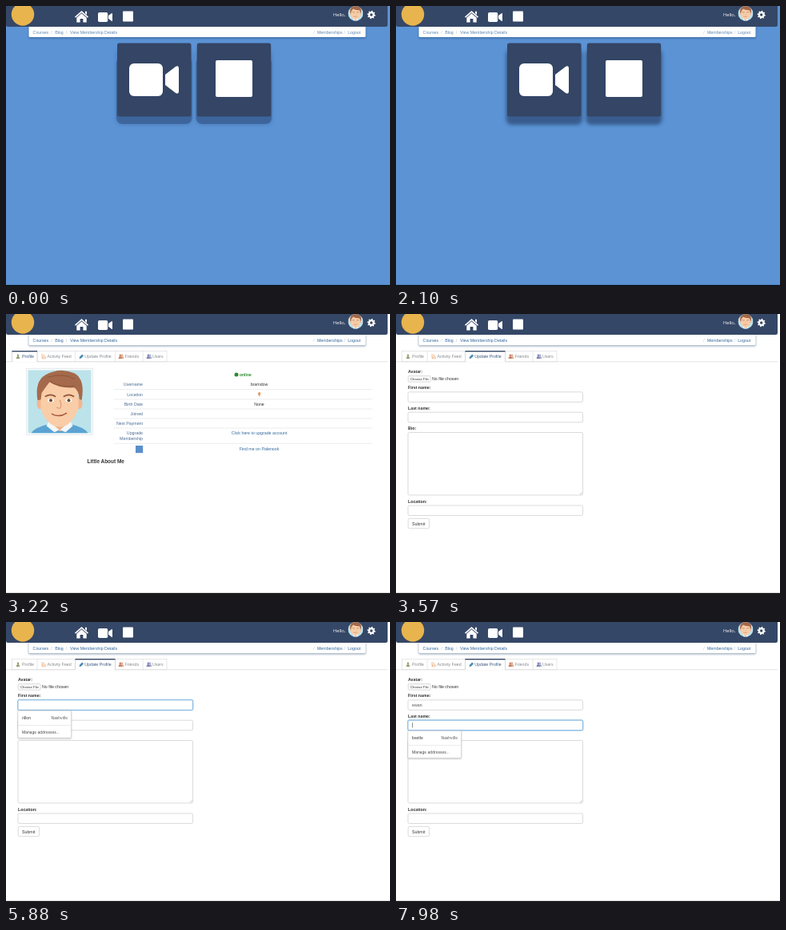
An HTML page for the animation above (8000 ms loop, 480x351 px).

```html
<!DOCTYPE html>
<html lang="en">
<head>
<meta charset="utf-8">
<title>Member profile</title>
<style>
html, body { margin: 0; width: 100%; height: 100%; overflow: hidden; background: #fff; }
svg { display: block; width: 100vw; height: 100vh; }
text { font-family: "Liberation Sans", Arial, sans-serif; font-size: 5.25px; white-space: pre; }
.b { font-weight: bold; }
.hello { font-family: "Open Sans", sans-serif; font-size: 5.7px; }
.menu text { font-family: Inter, sans-serif; font-size: 4.75px; }
</style>
</head>
<body>
<svg id="stage" viewBox="0 0 480 351" preserveAspectRatio="none"></svg>
<script>
const LOOP = 8000;
const NAVY = '#354766', LINK = '#33689c', LABEL = '#4b6b95', GREY = '#85898e', INK = '#333';

const rect = (x, y, w, h, fill, more = '') =>
  `<rect x="${x}" y="${y}" width="${w}" height="${h}" fill="${fill}" ${more}/>`;
const path = (d, fill, more = '') => `<path d="${d}" fill="${fill}" ${more}/>`;
const disc = (x, y, r, fill) => `<circle cx="${x}" cy="${y}" r="${r}" fill="${fill}"/>`;
const text = (x, y, s, fill = INK, more = '') =>
  `<text x="${x}" y="${y}" fill="${fill}" ${more}>${s}</text>`;
const group = (id, body, more = '') => `<g id="${id}" ${more}>${body}</g>`;
const at = (x, y, k, body) => `<g transform="translate(${x} ${y}) scale(${k})">${body}</g>`;
const END = 'text-anchor="end"', MID = 'text-anchor="middle"';

// Camera icon on a 62 x 41 grid
const camera = rect(0, 0, 42, 41, '#fff', 'rx="6"') +
  path('M45 14 L58 4 Q62 2 62 6 V35 Q62 39 58 37 L45 27 Z', '#fff');

// Portrait on a 79 x 79 grid
const line = (d, color, w) => path(d, 'none', `stroke="${color}" stroke-width="${w}" stroke-linecap="round"`);
const portrait = rect(0, 0, 79, 79, '#bce3ea') +
  path('M4 79 Q8 72 25 68 L39 76 L54 68 Q71 72 75 79 Z', '#5ba3d3') +
  path('M26 58 H53 V70 L40 77 L26 69 Z', '#eeb088') +
  path('M26 64 L23 70 L33 78 L39 75 Z M53 64 L56 70 L47 78 L40 75 Z', '#f2f7fa') +
  '<ellipse cx="15" cy="42" rx="4" ry="7" fill="#f3b78f"/><ellipse cx="64" cy="42" rx="4" ry="7" fill="#f3b78f"/>' +
  path('M16 25 Q17 10 40 11 Q62 10 63 25 V47 Q60 60 50 68 Q40 75 29 68 Q18 60 16 47 Z', '#f9cda8') +
  path('M12 38 Q8 14 22 6 Q40 -4 58 4 Q72 12 67 38 L64 36 Q64 27 58 22 Q38 23 27 15 Q20 24 17 29 L16 37 Z', '#a56a4b') +
  line('M27 14 Q40 22 58 20 M25 9 Q44 3 58 11', '#8d563b', 1) +
  line('M22 33 Q28 29 34 33 M45 33 Q51 29 57 33', '#8d563b', 1.8) +
  '<ellipse cx="28.5" cy="38" rx="4" ry="2.2" fill="#fff"/><ellipse cx="51" cy="38" rx="4" ry="2.2" fill="#fff"/>' +
  disc(28.5, 38, 2, '#694a35') + disc(51, 38, 2, '#694a35') +
  line('M40 38 Q43 47 39 48 L36 47', '#dd9b75', 1.2) +
  line('M30 55 Q39 60 48 54', '#a8573f', 1.5);

function gear(x, y) {
  let d = '';
  for (let i = 0; i < 32; i++) {
    const a = (i + .5) * Math.PI / 16, r = i % 4 < 2 ? 5.2 : 3.9;
    d += (i ? 'L' : 'M') + (x + r * Math.cos(a)).toFixed(2) + ' ' + (y + r * Math.sin(a)).toFixed(2);
  }
  return path(d + 'Z', '#fff') + disc(x, y, 1.7, NAVY);
}

function header() {
  const crumb = (x, s) => text(x, 34.6, s, 'currentColor');
  const slash = x => text(x, 34.6, '/', '#b5b9be');
  return rect(28, 25, 422, 15.5, '#1d3a5c', 'rx="2" opacity=".4" filter="url(#soft1)"') +
    rect(28.5, 24, 421, 15, '#fff', 'rx="1.5"') +
    path('M0 0 H477 V23.5 Q477 26 474.5 26 H2.5 Q0 26 0 23.5 Z', NAVY) +
    disc(21, 10.5, 14.2, '#e8b44d') +
    path('M94.5 6 L103 13.6 L102 14.8 L94.5 8.3 L87 14.8 L86 13.6 Z M99 6.8 H101 V11 L99 9.2 Z', '#fff') +
    path('M94.5 9.3 L100.7 14.7 V20.5 H96.4 V16 H92.6 V20.5 H88.3 V14.7 Z', '#fff') +
    at(115, 8, .29, camera) + rect(146, 6.5, 13, 13, '#fff', 'rx="1"') +
    text(409, 13, 'Hello,', '#fff', 'class="hello"') +
    `<g clip-path="url(#face)">${at(427.4, -.2, .243, portrait)}</g>` + gear(456.7, 11) +
    group('crumbs', crumb(33.6, 'Courses') + slash(56.2) + crumb(61.2, 'Blog') + slash(74.8) +
      crumb(80, 'View Membership Details') + slash(384.3) + crumb(389, 'Memberships') +
      slash(422.5) + crumb(427.2, 'Logout'));
}

function home() {
  const each = f => [139, 238.7].map(f).join('');
  return rect(0, 0, 480, 351, '#5b93d5') +
    group('hardShade', each(x => rect(x - 1.3, 64, 95, 84, '#3c659d', 'rx="8" opacity=".75"'))) +
    group('softShade', each(x => rect(x - 1.5, 54, 95.5, 95, '#253f68', 'rx="7" opacity=".65" filter="url(#soft3)"'))) +
    each(x => rect(x, 46.5, 92.5, 92, '#344565', 'rx="2.5"')) +
    at(154, 72, 1, camera) + rect(262, 68, 46, 46, '#fff', 'rx="2"');
}

function tabs() {
  const person = (x, c) => disc(x, 51.8, 1.3, c) + path(`M${x - 2.2} 56 Q${x - 2} 53 ${x} 53 Q${x + 2} 53 ${x + 2.2} 56 Z`, c);
  const pair = (x, a, b) => person(x + 1.2, b) + person(x - 1.2, a);
  const list = [[7.5, 39, 20, 'Profile'], [39, 87, 51.6, 'Activity Feed'], [86.5, 136.5, 98.3, 'Update Profile'],
    [136.5, 171, 148.5, 'Friends'], [171, 201, 183, 'Users']];
  const base = rect(7.5, 46.5, 193.5, 13.3, '#fff', 'stroke="#ddd" stroke-width=".7"') +
    list.slice(1).map(t => rect(t[0] - .3, 46.5, .7, 13, '#ddd')).join('') +
    rect(0, 59.4, 477, .8, '#ddd') +
    list.map(t => text(t[2], 55.4, t[3], GREY)).join('');
  const active = (id, [l, r, x, s]) => group(id, rect(l, 46.5, r - l, 14, '#fff') +
    path(`M${l} 60 V46.5 H${r} V60`, 'none', 'stroke="#ccc" stroke-width=".7"') +
    rect(l, 46, r - l, 1.4, NAVY) + text(x, 55.4, s, '#3c597f'));
  return base + active('tabProfile', list[0]) + active('tabUpdate', list[2]) +
    person(15, '#95a071') + disc(45.3, 55.2, .8, '#e99a5c') +
    line('M44.6 53 Q47.5 53 47.5 56 M44.6 51 Q49.3 51 49.3 56', '#e99a5c', .8) +
    path('M91.5 56.2 L92.2 53.6 L95.2 50.6 L97 52.4 L94 55.4 Z', '#4d8bb0') +
    pair(144, '#cd7c62', '#e0ac8f') + pair(179, '#7f83b5', '#aab0d0');
}

function profile() {
  const rows = [[90.4, 'Username', 'bramdow'], [102.6, 'Location', ''], [114.8, 'Birth Date', 'None'],
    [126.9, 'Joined', ''], [138.7, 'Next Payment', ''], [150.8, 'Upgrade', '']];
  const rule = y => `<path d="M135 ${y}H458" stroke="#d3d6d9" stroke-width=".7" stroke-dasharray="1 .6"/>`;
  return rect(25.7, 68.3, 82.6, 83, '#fff', 'stroke="#c3cdd4" stroke-width=".7" stroke-dasharray="1.2 .5"') +
    at(27.5, 70.3, 1, portrait) +
    disc(288, 76, 2.5, '#2f8a2f') + text(292, 77.9, 'online', '#2f8a2f', 'class="b" style="font-size:5px"') +
    rows.map(r => text(171, r[0], r[1], LABEL, END) + text(316.5, r[0], r[2], INK, MID)).join('') +
    text(171, 158.2, 'Membership', LABEL, END) +
    [94.6, 106.9, 119, 131, 143, 162.3].map(rule).join('') +
    disc(316.6, 99.7, 1.8, '#e0a070') + path('M315 100.5 H318.2 L316.6 103.7 Z', '#e0a070') +
    text(316.5, 150.8, 'Click here to upgrade account', LINK, MID) +
    text(316.5, 170.5, 'Find me on Palenook', LINK, MID) +
    rect(162, 165, 9.2, 9.2, '#5a8fcb') +
    text(101.6, 187, 'Little About Me', INK, 'class="b" style="font-size:6.44px"');
}

function field(id, y, h = 12.5) {
  const box = 'rx="1.6" stroke-width=".7" stroke=';
  return rect(15, y, 218.5, h, '#fff', box + '"#ccc"') +
    group(id, rect(15, y, 218.5, h, 'none', 'rx="2" stroke="#66afe9" stroke-width="2.4" opacity=".35"') +
      rect(15, y, 218.5, h, '#fff', box + '"#5fa4dc"'), 'opacity="0"');
}

function menu(id, y, name) {
  return group(id, rect(15, y + .6, 66.5, 34.4, '#000', 'opacity=".3" filter="url(#soft1)"') +
    rect(15, y, 66.5, 34, '#fff', 'rx=".8" stroke="#c8c8c8" stroke-width=".5"') +
    rect(15, y + 17.8, 66.5, .6, '#dedede') +
    text(20, y + 10.9, name, '#222') + text(77, y + 10.9, 'Nashville', '#555', END) +
    text(20, y + 28.4, 'Manage addresses...', '#444'), 'class="menu"');
}

function form() {
  const label = (y, s) => text(15, y, s, INK, 'class="b"');
  return label(74, 'Avatar:') + label(94, 'First name:') + label(119.7, 'Last name:') +
    label(145, 'Bio:') + label(236.6, 'Location:') +
    rect(15.2, 77.6, 28, 7.6, '#fafafa', 'rx="1" stroke="#bbb" stroke-width=".5"') +
    text(18, 83, 'Choose File', INK, 'style="font-size:4.3px"') + text(45, 82.5, 'No file chosen') +
    field('focusFirst', 97.8) + field('focusLast', 123.2) +
    field('focusBio', 148.5, 78.5) + field('focusPlace', 240) +
    line('M230 226 L232.4 223.6 M231.4 226 L232.4 225', '#999', .4) +
    rect(15.2, 256.4, 26.3, 12.4, '#fff', 'rx="1.6" stroke="#ccc" stroke-width=".7"') + text(20, 264.5, 'Submit') +
    text(20, 105.9, '', '#555', 'id="first"') +
    rect(20, 100.8, .6, 6.2, '#444', 'id="caretFirst"') + rect(20, 126.2, .6, 6.2, '#444', 'id="caretLast"') +
    menu('menuFirst', 111.2, 'rillon') + menu('menuLast', 136.4, 'bextle');
}

const soft = (id, r) => `<filter id="${id}" x="-20%" y="-50%" width="140%" height="200%"><feGaussianBlur stdDeviation="${r}"/></filter>`;
document.getElementById('stage').innerHTML =
  `<defs>${soft('soft1', 1)}${soft('soft3', 2.2)}<clipPath id="face"><circle cx="437" cy="9.4" r="9.4"/></clipPath></defs>` +
  rect(0, 0, 480, 351, '#fff') + group('home', home()) +
  group('member', tabs() + group('profile', profile()) + group('form', form())) +
  header() + rect(0, 349.8, 480, 1.2, '#000');

const el = {};
document.querySelectorAll('#stage [id]').forEach(n => el[n.id] = n);
const show = (id, on) => el[id].style.display = on ? '' : 'none';
const fade = (id, v) => el[id].setAttribute('opacity', v);
const ramp = (t, a, b) => {
  const k = Math.min(1, Math.max(0, (t - a) / (b - a)));
  return k * k * (3 - 2 * k);
};

const OPEN = 2170, EDIT = 3500, FOCUS = 4270, TYPE = 6090, NEXT = 7630;
const typed = [[TYPE, 'e'], [6300, 'ew'], [6510, 'ewn'], [7000, 'ew'], [7070, 'ewa'], [7140, 'ewan']];

function caretAlpha(t) {
  if (t < FOCUS || t >= NEXT) return 0;
  if (t >= TYPE) return 1;
  if (t < 4830) return t < 4690 ? 1 : .5;
  return t >= 5390 && t < 5880 ? 1 : 0;
}

function draw(t) {
  const onHome = t < OPEN, editing = t >= EDIT;
  show('home', onHome);
  show('member', !onHome);
  show('profile', !editing);
  show('tabProfile', !editing);
  show('form', editing);
  show('tabUpdate', editing);
  el.crumbs.style.color = onHome ? '#5f86ad' : LINK;

  const settle = ramp(t, 70, 280);
  fade('hardShade', 1 - settle);
  fade('softShade', .35 + .65 * settle);

  fade('focusFirst', ramp(t, 4200, 4350) * (1 - ramp(t, NEXT, NEXT + 150)));
  fade('focusLast', ramp(t, NEXT, NEXT + 150));
  show('menuFirst', t >= 4340 && t < 6160);
  show('menuLast', t >= 7770);

  const word = typed.reduce((s, [from, next]) => t >= from ? next : s, '');
  el.first.textContent = word;
  el.caretFirst.setAttribute('x', 20 + (editing && word ? el.first.getComputedTextLength() + .2 : 0));
  fade('caretFirst', caretAlpha(t));
  fade('caretLast', t >= NEXT ? 1 : 0);
}

const start = performance.now();
function tick() {
  draw((performance.now() - start) % LOOP);
  requestAnimationFrame(tick);
}
tick();
</script>
</body>
</html>
```
